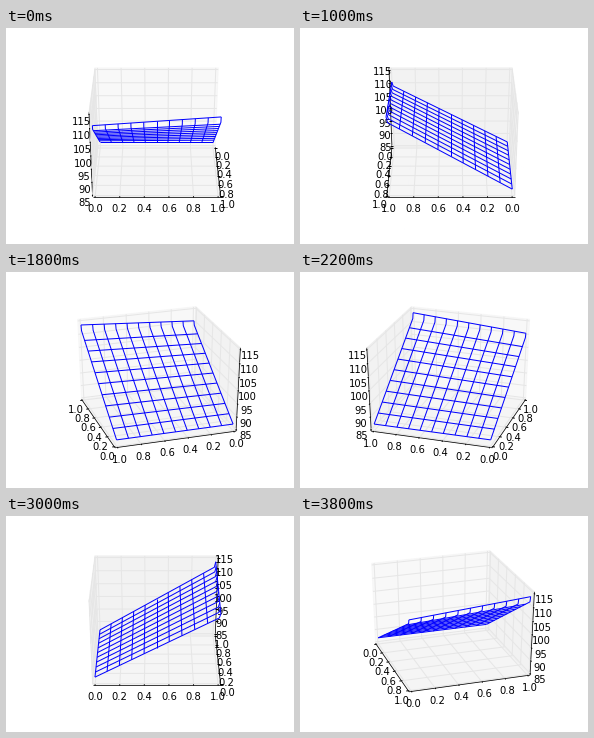
Animation of 288 by 216 pixels, one loop 4000 ms. Source, as a matplotlib script:

```python
import numpy as np
import matplotlib.pyplot as plt
from matplotlib.animation import FuncAnimation
from matplotlib.collections import LineCollection
from matplotlib.lines import Line2D
from matplotlib.patches import Polygon

FRAMES, LOOP = 20, 4000
DIST, ELEV = 10, np.radians(30)
LOW, HIGH = np.array([0, 0, 85.0]), np.array([1, 1, 115.0])
SPAN, MID = HIGH - LOW, (LOW + HIGH) / 2
DELTA = SPAN / 12
MINS, MAXS = LOW - DELTA / 4, HIGH + DELTA / 4

UNIT_TICKS = [(v, f"{v:.1f}") for v in np.linspace(0, 1, 6)]
Z_TICKS = [(v, str(v)) for v in range(85, 116, 5)]
# ticks, tick direction, axes flipped to reach the axis line, pane grey
AXES = [
    (UNIT_TICKS, 1, (1, 0), 0.95),
    (UNIT_TICKS, 0, (0, 1), 0.90),
    (Z_TICKS, 0, (0, 2), 0.925),
]

plt.rcParams.update({"font.family": "DejaVu Sans", "font.size": 10})
fig = plt.figure(figsize=(4, 3), dpi=72, facecolor="white")
ax = fig.add_axes([0.125, 0.125, 0.775, 0.775])


def project(points, azim):
    u, v, w = np.moveaxis((np.asarray(points, float) - MID) / SPAN, -1, 0)
    ahead = u * np.cos(azim) + v * np.sin(azim)
    side = v * np.cos(azim) - u * np.sin(azim)
    rise = w * np.cos(ELEV) - ahead * np.sin(ELEV)
    depth = DIST - ahead * np.cos(ELEV) - w * np.sin(ELEV)
    return np.stack([side / depth, rise / depth], -1)


def flip(point, i):
    out = point.copy()
    out[i] = MINS[i] if point[i] == MAXS[i] else MAXS[i]
    return out


def moved(point, i, value):
    out = point.copy()
    out[i] = value
    return out


def surface():
    """Wire lines of a tilted sheet with a raised rim at x = 1."""
    t = np.linspace(0, 1, 101)
    x, y = np.meshgrid(t, t, indexing="ij")
    z = 86.9 + x * (22.4 + 2.6 * y)
    z[-1] += 1.3 + 0.5 * t
    grid = np.stack([x, y, z], -1)
    return [grid[i] for i in range(0, 101, 10)] + [grid[:, i] for i in range(0, 101, 10)]


WIRES = surface()


def draw(frame):
    azim = 2 * np.pi * frame / FRAMES
    ax.clear()
    ax.set_axis_off()
    ax.set(xlim=(-0.95 / DIST, 0.9 / DIST), ylim=(-0.95 / DIST, 0.9 / DIST))
    order = iter(range(1, 1000))

    def line(points, width):
        xs, ys = project(points, azim).T
        ax.add_artist(Line2D(xs, ys, color="black", lw=width, zorder=next(order),
                             solid_capstyle="butt", clip_on=False))

    def wires(paths, color):
        ax.add_artist(LineCollection([project(p, azim) for p in paths], colors=[color],
                                     linewidths=1, zorder=next(order), clip_on=False))

    toward = np.array([np.cos(azim), np.sin(azim), 1])
    far = np.where(toward < -1e-9, MAXS, MINS)

    for i, (_, _, _, grey) in enumerate(AXES):
        j, k = (i + 1) % 3, (i + 2) % 3
        corners = [far, flip(far, j), flip(flip(far, j), k), flip(far, k)]
        ax.add_artist(Polygon(project(corners, azim), closed=False, color=(grey,) * 3,
                              alpha=0.5, lw=1, zorder=next(order), clip_on=False))

    for i, (ticks, tdir, (first, second), _) in enumerate(AXES):
        start = flip(far, first)
        line([start, flip(start, second)], 0.75)
        rows = [moved(far, i, v) for v, _ in ticks]
        wires([[flip(r, (i + 1) % 3), r, flip(r, (i + 2) % 3)] for r in rows], "0.9")

        step = DELTA[tdir] * (1 if far[tdir] == MAXS[tdir] else -1)
        for value, label in ticks:
            pos = moved(start, i, value)
            line([moved(pos, tdir, pos[tdir] + 0.1 * step),
                  moved(pos, tdir, pos[tdir] - 0.2 * step)], 1)
            out = pos + 0.7 * DELTA * np.where(pos < MID, -1, 1)
            x, y = project(moved(out, i, value), azim)
            ax.text(x, y, label, ha="center", va="top", zorder=next(order))

    wires(WIRES, "blue")
    return []


anim = FuncAnimation(fig, draw, frames=FRAMES, interval=LOOP / FRAMES,
                     init_func=lambda: [], repeat=True, repeat_delay=0)
plt.show()
```
